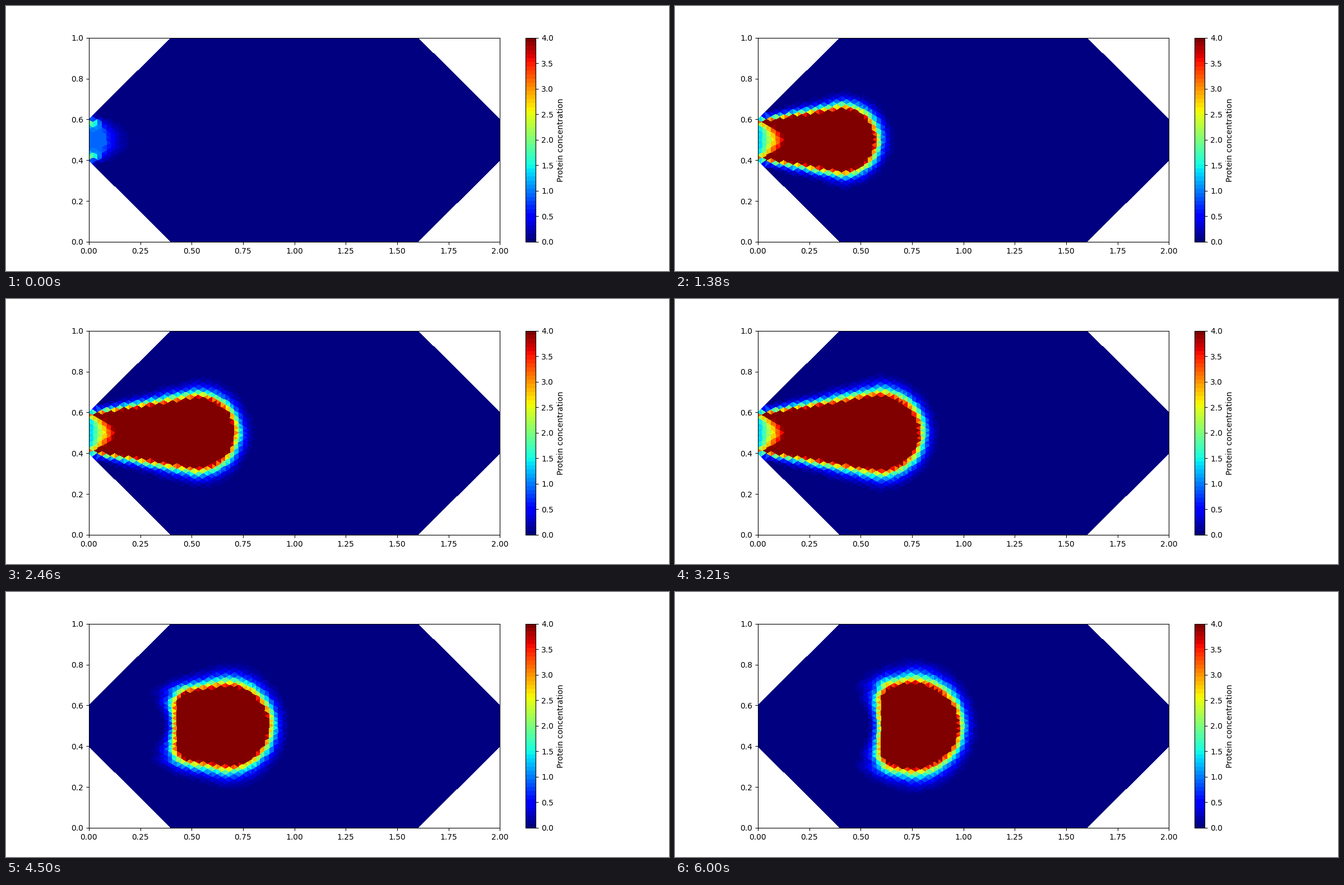
These frames come from a looping animation (1183 by 473 pixels, 6.03 s). A matplotlib script:

```python
import numpy as np
import matplotlib.pyplot as plt
from matplotlib.animation import FuncAnimation
from matplotlib.patches import Polygon
from matplotlib.tri import Triangulation

FRAMES, STEP_MS = 201, 30
W, H, DPI = 1183, 473, 100
SIDE, COL = 0.025, 0.0214          # cell edge and column spacing
VMAX = 4.0
SHUTOFF = 113                      # step at which the inflow stops

CORNERS = np.array([(0, .4), (.4, 0), (1.6, 0), (2, .4),
                    (2, .6), (1.6, 1), (.4, 1), (0, .6)])

# position of the leading and the trailing edge on the axis
FRONT_N = [0, 5, 10, 21, 46, 63, 82, 107, 129, 172, 200]
FRONT_X = [.075, .215, .295, .425, .565, .643, .703, .78, .829, .918, .972]
TAIL_N = [SHUTOFF, 116, 120, 124, 129, 148, 172, 200]
TAIL_X = [-.01, .09, .19, .255, .314, .42, .518, .603]


def make_mesh():
    pts = []
    for p, q in zip(CORNERS, np.roll(CORNERS, -1, axis=0)):
        n = int(round(np.hypot(*(q - p)) / SIDE))
        pts += [p + (q - p) * i / n for i in range(n)]
    for k in range(1, int(1.3 / COL)):
        for y in np.arange(SIDE / 2 * (k % 2), 1, SIDE):
            x = k * COL
            wall = (x + .1 - abs(y - .5)) / np.sqrt(2)
            if wall > .55 * SIDE and .01 < y < .99:
                pts.append((x, y))
    x, y = np.array(pts).T
    tris = Triangulation(x, y).triangles
    cx, cy = x[tris].mean(axis=1), y[tris].mean(axis=1)
    keep = (cx < 1.16) & (abs(cy - .5) < .37)
    return Triangulation(x, y, tris[keep]), cx[keep], abs(cy[keep] - .5)


def half_width(x):
    return .084 + .165 * x


def rim(x):
    return .042 + .11 * x


def front_distance(n, x, y):
    tip = np.interp(n, FRONT_N, FRONT_X)
    a = min(.06 + .17 * tip, .6 * tip)
    peak = tip - a
    b = half_width(peak)
    side = (y - half_width(x)) / rim(x)

    # rounded head beyond the widest point
    rho = np.hypot((x - peak) / a, y / b) + 1e-9
    r = np.hypot(x - peak, y) + 1e-9
    cos2 = ((x - peak) / r) ** 2
    head_rim = .095 + .065 * np.exp(-n / 5)
    width = head_rim * cos2 + rim(peak) * (1 - cos2)
    head = r * (1 - 1 / rho) / width
    return np.maximum(np.where(x > peak, head, side), 0)


def tail_distance(n, x, y):
    if n < SHUTOFF:
        return np.zeros_like(x)
    q = y / half_width(x)
    edge = np.interp(n, TAIL_N, TAIL_X) + .04 * np.minimum(q, 1) ** 8
    width = .065 + .08 * np.minimum(q, 1.2) ** 2
    return np.maximum((edge - x) / width, 0)


def concentration(n, x, y):
    s = np.hypot(front_distance(n, x, y), tail_distance(n, x, y))
    young = np.exp(-n / 4)
    plume = (4.05 - 3.1 * young) * np.exp(-2.4 * s - 1.4 * s ** 2)
    inlet = (1.2 + 2.8 * (x / .13) ** 1.2 * (1 + 1.2 * (y / .08) ** 2)
             + 1.8 * np.exp(-((y - .09) / .015) ** 2))
    jets = 1.2 * young * np.exp(-((y - .085) / .02) ** 2 - (x / .04) ** 2)
    return np.minimum(plume, inlet) + jets


mesh, cx, cy = make_mesh()
cmap = plt.get_cmap("jet", 50)

fig, ax = plt.subplots(figsize=((W + .01) / DPI, (H + .01) / DPI), dpi=DPI)
ax.add_patch(Polygon(CORNERS, facecolor=cmap(0), edgecolor="none",
                     antialiased=False, zorder=.5))
cells = ax.tripcolor(mesh, facecolors=concentration(0, cx, cy),
                     cmap=cmap, vmin=0, vmax=VMAX)
ax.set_xlim(0, 2)
ax.set_ylim(0, 1)
fig.colorbar(cells, ax=ax, label="Protein concentration",
             ticks=np.arange(0, 4.1, .5))


def update(n):
    cells.set_array(concentration(n, cx, cy))
    return [cells]


anim = FuncAnimation(fig, update, frames=FRAMES, interval=STEP_MS,
                     repeat=True, repeat_delay=0)
plt.show()
```
